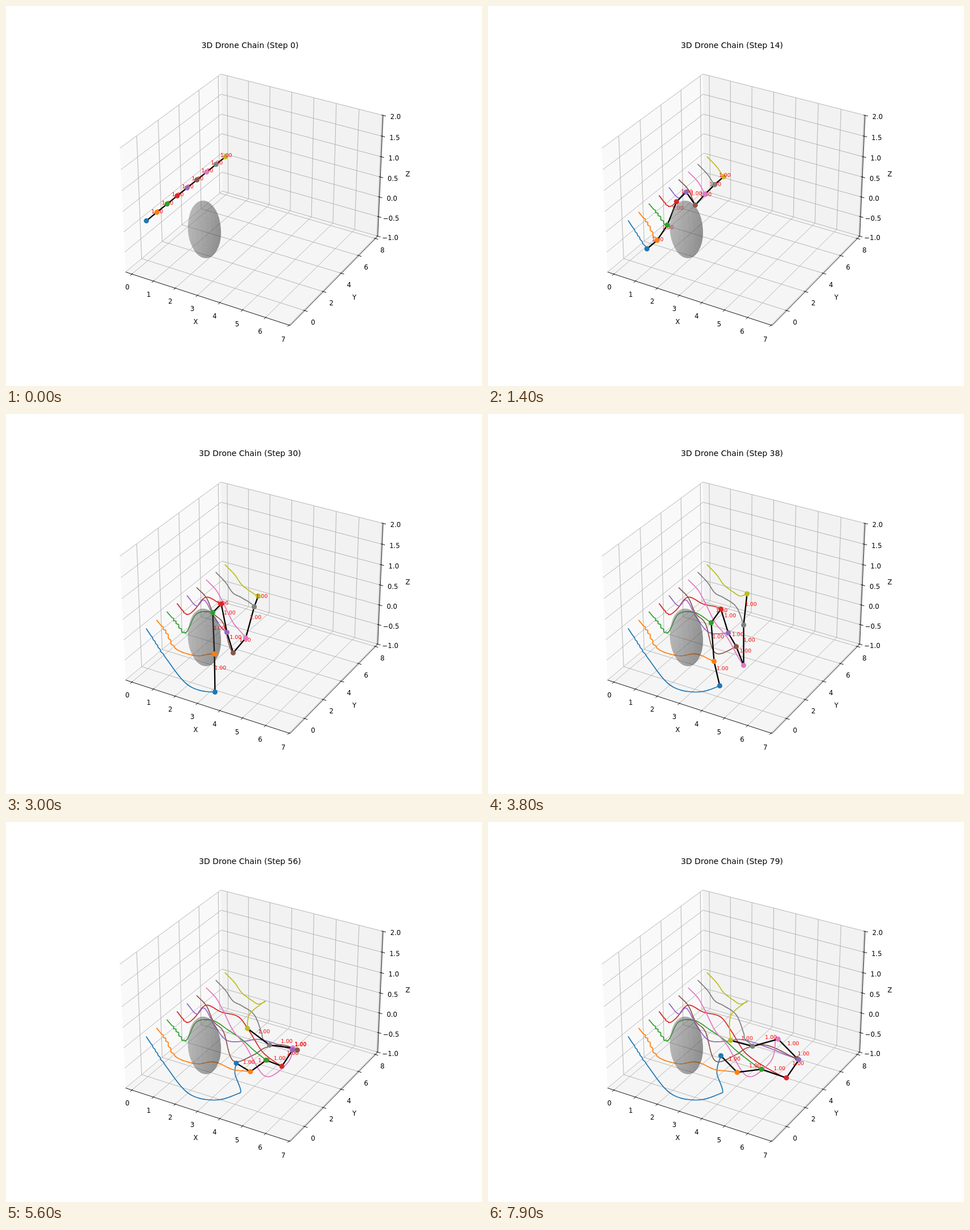
An HTML page for the animation above (8000 ms loop, 837 by 669 pixels).

```html
<!DOCTYPE html>
<html lang="en">
<head>
<meta charset="utf-8">
<title>3D Drone Chain</title>
<style>
  html, body { margin: 0; width: 100%; height: 100%; overflow: hidden; background: #fff; }
  svg { display: block; width: 100vw; height: 100vh; }
  text { font-family: "DejaVu Sans", sans-serif; font-size: 11.62px; text-anchor: middle; }
  .title { font-size: 13.95px; }
  .dist { font-size: 9.3px; fill: #f00; text-anchor: start; }
  .grid { fill: none; stroke: #b0b0b0; stroke-width: .93; }
  .axis { fill: none; stroke: #000; stroke-width: .93; }
  .trail { fill: none; stroke-width: 1.74; stroke-linejoin: round; stroke-linecap: square; }
  .link { stroke: #000; stroke-width: 2.33; stroke-linecap: square; }
</style>
</head>
<body>
<svg id="stage" viewBox="0 0 837 669"></svg>
<script>
const STEPS = 80, STEP_MS = 100;
const stage = document.getElementById('stage');

function set(el, attrs) {
  for (const key in attrs) el.setAttribute(key, attrs[key]);
}
function add(parent, tag, attrs, text) {
  const el = document.createElementNS('http://www.w3.org/2000/svg', tag);
  set(el, attrs);
  if (text !== undefined) el.textContent = text;
  parent.appendChild(el);
  return el;
}
const group = () => add(stage, 'g', {});
const pts = list => list.map(p => p[0].toFixed(2) + ',' + p[1].toFixed(2)).join(' ');
const range = (from, to, by = 1) =>
  Array.from({ length: Math.round((to - from) / by) + 1 }, (_, i) => from + i * by);

// Perspective camera: elevation 30, azimuth -60, distance 10
const X = [-0.295, 7.045], Y = [-1.52, 8.28], Z = [-1, 2];
const unit = (v, [lo, hi]) => (v - lo) / (hi - lo) - 0.5;
function project([x, y, z]) {
  const a = unit(x, X) * 1.1429, b = unit(y, Y) * 1.1429, c = unit(z, Z) * 0.8571;
  const depth = 10 - (0.433 * a - 0.75 * b + 0.5 * c);
  const k = 2900 / depth;
  return [435.92 + k * (0.866 * a + 0.5 * b), 330.89 - k * (-0.25 * a + 0.433 * b + 0.866 * c), depth];
}

// Box: panes, grid, axes, ticks, labels
const [x0, x1] = X, [y0, y1] = Y, [z0, z1] = Z;
const room = group();
const line = (cls, ...points) => add(room, 'polyline', { class: cls, points: pts(points.map(project)) });
const pane = (fill, ...points) => add(room, 'polygon', { fill, points: pts(points.map(project)) });
const label = (text, x, y) => add(room, 'text', { x, y: y + 4.2 }, text);

pane('#f9f9f9', [x0, y0, z0], [x0, y1, z0], [x0, y1, z1], [x0, y0, z1]);
pane('#f2f2f2', [x0, y1, z0], [x1, y1, z0], [x1, y1, z1], [x0, y1, z1]);
pane('#f5f5f5', [x0, y0, z0], [x1, y0, z0], [x1, y1, z0], [x0, y1, z0]);

const xs = range(0, 7), ys = range(0, 8, 2), zs = range(-1, 2, 0.5);
xs.forEach(x => line('grid', [x, y0, z0], [x, y1, z0], [x, y1, z1]));
ys.forEach(y => line('grid', [x1, y, z0], [x0, y, z0], [x0, y, z1]));
zs.forEach(z => line('grid', [x0, y0, z], [x0, y1, z], [x1, y1, z]));
line('axis', [x0, y0, z0], [x1, y0, z0], [x1, y1, z0], [x1, y1, z1]);

const tx = (x1 - x0) / 120, ty = (y1 - y0) / 120;
xs.forEach(x => {
  line('axis', [x, y0 + ty, z0], [x, y0 - 2 * ty, z0]);
  const [px, py] = project([x, y0, z0]);
  label(x, px - 8 - x * 0.28, py + 22.8 + x * 0.28);
});
ys.forEach(y => {
  line('axis', [x1 - tx, y, z0], [x1 + 2 * tx, y, z0]);
  const [px, py] = project([x1, y, z0]);
  label(y, px + 14.8 - y * 0.3, py + 20.2);
});
zs.forEach(z => {
  line('axis', [x1 - tx, y1, z], [x1 + 2 * tx, y1, z]);
  const [px, py] = project([x1, y1, z]);
  label(z.toFixed(1).replace('-', '\u2212'), px + 22, py + 2.8);
});
label('X', 333.5, 555.3);
label('Y', 612.5, 512.3);
label('Z', 706.5, 295.3);
const title = add(room, 'text', { class: 'title', x: 429, y: 73.6 });

const trailLayer = group(), linkLayer = group(), farLayer = group();
const distLayer = group(), ballLayer = group(), dotLayer = group();

// Translucent shaded ball: far facets first
function drawBall() {
  const n = 19, r = 0.685, centre = [2.304, 0.755, 0], light = [-0.667, -0.667, 0.333];
  const normal = (i, j) => {
    const u = i / n * 2 * Math.PI, v = j / n * Math.PI;
    return [Math.cos(u) * Math.sin(v), Math.sin(u) * Math.sin(v), Math.cos(v)];
  };
  const corner = (i, j) => project(normal(i, j).map((c, k) => centre[k] + r * c));
  const facets = [];
  for (let i = 0; i < n; i++) for (let j = 0; j < n; j++) {
    const corners = [corner(i, j), corner(i + 1, j), corner(i + 1, j + 1), corner(i, j + 1)];
    const dot = normal(i + 0.5, j + 0.5).reduce((sum, c, k) => sum + c * light[k], 0);
    const grey = Math.round(128 * (0.3 + 0.35 * (dot + 1)));
    facets.push({ corners, grey, depth: corners.reduce((sum, c) => sum + c[2], 0) });
  }
  facets.sort((a, b) => b.depth - a.depth).forEach(f =>
    add(ballLayer, 'polygon', { points: pts(f.corners), fill: `rgb(${f.grey},${f.grey},${f.grey})`, 'fill-opacity': 0.3 }));
}
drawBall();

// Smooth curve through points reached at the key steps
const KEYS = [0, 8, 14, 22, 30, 38, 43, 49, 64, 79];
function sample(points, step) {
  const end = KEYS.length - 1;
  let i = 0;
  while (i < end - 1 && KEYS[i + 1] <= step) i++;
  const h = KEYS[i + 1] - KEYS[i], u = (step - KEYS[i]) / h, u2 = u * u, u3 = u2 * u;
  return [0, 1].map(axis => {
    const slope = k => {
      const p = Math.max(k - 1, 0), q = Math.min(k + 1, end);
      return (points[q][axis] - points[p][axis]) / (KEYS[q] - KEYS[p]);
    };
    return (2 * u3 - 3 * u2 + 1) * points[i][axis] + (u3 - 2 * u2 + u) * h * slope(i)
      + (3 * u2 - 2 * u3) * points[i + 1][axis] + (u3 - u2) * h * slope(i + 1);
  });
}

const drones = [];
function drone(color, ...bends) {
  const i = drones.length;
  // All start in a row, drift steadily, and settle with the middle bulging outwards
  const [sx, sy] = project([0, i, 0]);
  const drift = [sx + 8 * 2.1, sy + 8 * (2.2 + 2 ** -i)];
  const way = bends.map(([x, y]) => [x + 0.5, y + 0.5]);
  const [ex, ey] = way[way.length - 1];
  const bulge = Math.sin(Math.PI * i / 8) ** 3;
  const points = [[sx, sy], drift, ...way, [ex + 13 * bulge, ey + 5 * bulge]];
  // Drones pushed off the ball tremble on the way
  const shake = Math.max(0, 1.4 - 0.6 * Math.abs(i - 1.5));
  const path = range(0, STEPS - 1).map(step => {
    const [x, y] = sample(points, step);
    const s = step > 4 && step < 14 ? shake * (-1) ** step : 0;
    return [x - s, y + s * 0.8];
  });
  drones.push({ color, path });
}

drone('#1f77b4', [279, 427], [320, 477], [367, 489], [407, 478], [412, 471], [402, 442], [409, 411]);
drone('#ff7f0e', [297, 412], [334, 425], [366, 422], [397, 435], [409, 437], [420, 438], [437, 440]);
drone('#2ca02c', [315, 385], [334, 352], [363, 349], [392, 367], [415, 383], [436, 402], [476, 433]);
drone('#d62728', [331, 344], [351, 322], [378, 334], [409, 343], [427, 367], [453, 407], [514, 446]);
drone('#9467bd', [348, 327], [366, 357], [388, 384], [422, 385], [441, 382], [471, 389], [533, 413]);
drone('#8c564b', [364, 350], [382, 369], [399, 420], [436, 409], [455, 397], [487, 392], [533, 412]);
drone('#e377c2', [381, 331], [399, 367], [421, 394], [449, 442], [468, 446], [498, 419], [505, 380]);
drone('#7f7f7f', [398, 314], [414, 323], [436, 339], [449, 371], [451, 381], [460, 389], [464, 394]);
drone('#bcbd22', [414, 300], [431, 313], [443, 320], [455, 316], [452, 317], [427, 339], [426, 384]);

const last = drones.length - 1;
drones.forEach((d, i) => {
  d.trail = add(trailLayer, 'polyline', { class: 'trail', stroke: d.color });
  if (i === last) return;
  d.link = add(linkLayer, 'line', { class: 'link' });
  d.dist = add(distLayer, 'text', { class: 'dist' }, '1.00');
});
// The farthest dot lies under the distances, nearer ones over them
for (let i = last; i >= 0; i--) {
  drones[i].dot = add(i === last ? farLayer : dotLayer, 'circle', { r: 4.5, fill: drones[i].color });
}

function draw(step) {
  title.textContent = `3D Drone Chain (Step ${step})`;
  drones.forEach((d, i) => {
    const [x, y] = d.path[step];
    set(d.trail, { points: pts(d.path.slice(0, step + 1)) });
    set(d.dot, { cx: x, cy: y });
    if (i === last) return;
    const [nx, ny] = drones[i + 1].path[step];
    set(d.link, { x1: x, y1: y, x2: nx, y2: ny });
    set(d.dist, { x: (x + nx) / 2 - 0.6, y: (y + ny) / 2 - 6.1 });
  });
}

let shown = -1;
function tick(now) {
  const step = Math.floor(now / STEP_MS) % STEPS;
  if (step !== shown) draw(shown = step);
  requestAnimationFrame(tick);
}
draw(0);
requestAnimationFrame(tick);
</script>
</body>
</html>
```
